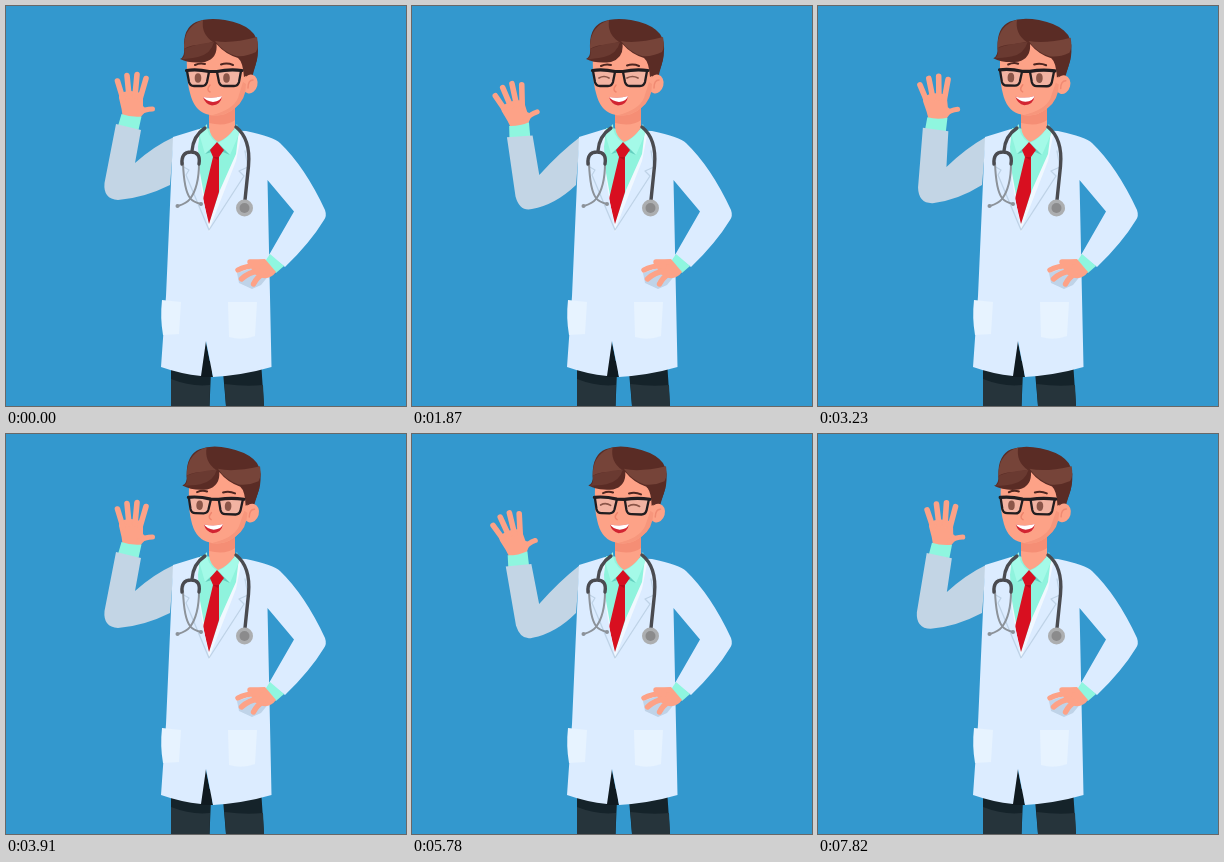
An HTML page that plays this animation: 400 by 400 pixels, repeating every 7990 ms.

```html
<!DOCTYPE html>
<html lang="en">
<head>
<meta charset="utf-8">
<title>Waving doctor</title>
<style>
  html, body { margin: 0; width: 100%; height: 100%; overflow: hidden; background: #3398ce; }
  svg { display: block; width: 100vw; height: 100vh; }
  .line { fill: none; stroke-linecap: round; stroke-linejoin: round; }
</style>
</head>
<body>
<svg viewBox="0 0 400 400">
  <!-- trousers -->
  <path fill="#15232a" d="M165 355H255L258 400H220L217 366H205L203.500 400H165Z"/>
  <path fill="#26343b" d="M165 373Q185 381 204 379L203.500 400H165ZM218.500 378Q240 381 257 379L258 400H220Z"/>
  <path fill="#101a20" d="M199 332L207 371H194Z"/>

  <!-- waving arm -->
  <g id="hand">
    <path fill="#fda287" d="M113 88Q124 82 137 88Q137 95 137 100Q142 104 139 106L133 113H117Q116 103 113 92Z"/>
    <g class="line" stroke="#fda287" stroke-width="5.600">
      <path d="M111.500 75L117 93M121 69.500L123 90M131 68.500L129 90M140 72.500L134 93"/>
      <path d="M133 107Q139 103 146.500 103" stroke-width="5"/>
    </g>
    <path fill="#8ff6df" d="M115.500 108Q125 111.500 135.500 110.500L132.500 124L112 120Z"/>
  </g>
  <path id="sleeve" fill="#c3d5e5"/>

  <!-- coat -->
  <path fill="#dcecff" d="M193 123L167 131L160 290L155 361Q175 368 195 370L200 335L207 371Q238 369 265.500 361L261.500 174L288 205.500L263 249L279 261Q304 237 318 214Q321 210 319 204Q299 161 274 137Q268 131 240 125Z"/>
  <path fill="#e7f3ff" d="M156 294L175 296L173 328L157 329Q154 312 156 294ZM222 296H251L249 330Q236 335 223 331Z"/>

  <!-- shirt, neck, tie -->
  <path fill="#f1f8ff" d="M191 124L184 153L203 226L234 155L236 125Z"/>
  <path fill="#8ff3dd" d="M194 122L191 150L203 217L214 184L230 148L233 124Z"/>
  <path fill="#fda287" d="M203 98L229 92V122Q222 132 212 136Q204 131 203 121Z"/>
  <path fill="#f58e75" d="M203 106Q222 110 229 98V114Q220 121 203 117Z"/>
  <path fill="#a4fae8" d="M201 118Q200 129 211 137L199 148L193 127ZM231 118Q225 131 212 137L224 149L233 128Z"/>
  <path fill="#64cfbf" d="M211 137L199 148L206 146ZM212 137L224 149L217 146Z"/>
  <path fill="#d80f20" d="M211 136L218 144L213 151L213 186L203 218L197 193L207 151L204 144Z"/>
  <path fill="#b80b1a" d="M207 151L213 151L212 154Z"/>
  <!-- lapels -->
  <path fill="#dcecff" d="M191 124L185 133L177 162L183 164L181 170L203 224L194 174ZM236 125L242 162L234 165L238 170L203 224L230 155Z"/>
  <path class="line" stroke="#bfd3e7" stroke-width="1.300" d="M180 145L176 160L183 164L180 169L203 224L238 170L233 165L242 161L239 145"/>

  <!-- stethoscope -->
  <g class="line" stroke-width="3.400">
    <path stroke="#8c9299" stroke-width="2" d="M177 157Q178 184 184 192Q187 196 195 198M193 157Q193 181 184 193Q181 197 172 200"/>
    <path stroke="#4a4b50" d="M199 122Q187 130 186 145M176 158Q175 146 185 146Q195 146 193 158M230 121Q245 133 242.500 160L239 194"/>
  </g>
  <circle cx="171.500" cy="200" r="2" fill="#8c9299"/><circle cx="195" cy="198" r="2" fill="#8c9299"/>
  <circle cx="238.500" cy="202" r="8.500" fill="#acaeb0"/>
  <circle cx="238.500" cy="202" r="5" fill="#8b8b8c"/>

  <!-- hand on hip -->
  <path fill="#bfd3e8" d="M231 267L246 262L264 268L255 279L246 283L233 277Z"/>
  <path fill="#8ff6df" d="M264 248L278 260L270 267L258 257Z"/>
  <path fill="#fda287" d="M259 253L270 266Q265 273 257 272L246 267L245 255Z"/>
  <path class="line" stroke="#fda287" stroke-width="5.400" d="M257 256L244 256M252 260Q241 259 232 264M253 265Q243 266 235.500 273M257 268Q251 271 247.500 278"/>

  <!-- head -->
  <g id="head">
    <path fill="#5a2c25" d="M205 28L243 24Q253 34 251 53L246 72L236 77Z"/>
    <ellipse cx="244" cy="78" rx="7.500" ry="9.500" fill="#fda287" transform="rotate(14 244 78)"/>
    <path class="line" stroke="#f08a72" stroke-width="1.500" d="M242 82Q242 74 247 74"/>
    <path fill="#fda287" d="M181 44Q180 74 184 87Q188 104 200 108Q216 113 229 102Q240 92 240 68L234 38H190Z"/>
    <path fill="#f7967c" d="M237 76L240 78Q240 94 229 102Q218 111 205 109.500Q227 104 232 92Z"/>
    <path fill="#5a2c25" d="M174 53Q179 51 178 42Q177 22 190 16Q202 11 219 14Q236 17 244 24Q253 31 252 45Q252 54 247 66L238 71Q237 56 232 52Q219 48 210.500 38Q212 52 199 56Q184 58 174 53Z"/>
    <path fill="#764439" d="M178 39Q179 20 197 14Q195 28 207 36Q200 38 192 39Q184 39 178 43ZM209 35Q225 38 251 31Q253 41 250 46Q240 51 230 50Q217 46 209 35Z"/>
    <path fill="#6a3a31" d="M178 43Q189 38 208 36Q205 48 192 51Q181 53 176 53Q180 50 178 43Z"/>
    <g id="brows" class="line" stroke="#4e2620" stroke-width="2">
      <path d="M189 59Q194 56.500 199 58M215 58.500Q221 56.500 227 59"/>
    </g>
    <path fill="#f2b3a2" d="M181 65H202L200 79Q191 82 183 78ZM212 65H235L232 78Q222 82 214 79Z"/>
    <g id="eyes" fill="#8b5649">
      <ellipse cx="192" cy="72" rx="3.300" ry="4.800"/>
      <ellipse cx="220.500" cy="72" rx="3.300" ry="4.800"/>
    </g>
    <path id="lids" class="line" stroke="#8b5649" stroke-width="1.700" d="M187 72Q192 69 197 72M215 72Q220.500 69 226 72"/>
    <g class="line" stroke="#211d20" stroke-width="2.300">
      <path d="M181 65L183 76Q184 80 188 80H196Q200 80 201 76L203 66M211 66L213 76Q214 80 218 80H228Q232 80 233 76L235 65"/>
      <path stroke-width="3.200" d="M180.500 64.500Q191 63 203 65.500H211Q223 63 236 64.500"/>
    </g>
    <path class="line" stroke="#ef856d" stroke-width="1.500" d="M204 79Q200 84 204 86"/>
    <path fill="#d22532" d="M197 91Q207 93 216 90Q215 99 206 99.500Q199 98 197 91Z"/>
    <path fill="#fff" d="M197 91Q207 93 216 90Q215 95 207 96Q200 95 197 91Z"/>
  </g>
</svg>
<script>
const LOOP = 7990, STEP = 170, WAVE = 4080, PEAK = 1530, REST = 3910;
const el = id => document.getElementById(id);
const clamp = v => Math.max(0, Math.min(1, v));
const ramp = (t, from, to) => clamp((t - from) / (to - from));

// s runs from 0 (forearm upright) to 1 (swung outwards)
function poseArm(s) {
  const deg = -20.6 * s, a = deg * Math.PI / 180;
  const dx = 2.8 * s, dy = 11.2 * s;
  const p = (x, y) => {
    const u = x - 113, v = y - 176;
    return [113 + dx + u * Math.cos(a) - v * Math.sin(a),
            176 + dy + u * Math.sin(a) + v * Math.cos(a)].map(n => n.toFixed(2)).join(' ');
  };
  el('hand').setAttribute('transform', `translate(${dx} ${dy}) rotate(${deg} 113 176)`);
  el('sleeve').setAttribute('d',
    `M${p(110, 118)}L${p(98.5 + 2 * s, 177)}Q${p(97 + 3 * s, 193)} ${p(112, 194)}` +
    `Q${138 + 6 * s} ${192 + 8 * s} 164 179L168 131` +
    `Q${148 - s} ${140 + 8 * s} ${129 - 2 * s} ${157 + 14 * s}L${p(135, 124)}Z`);
}

function draw(now) {
  const t = Math.floor(now % LOOP / STEP) * STEP, w = t % WAVE;
  poseArm(w < PEAK ? w / PEAK : 1 - ramp(w, PEAK, REST));

  const tilt = 2 * (ramp(t, 2380, REST) - ramp(t, 7650, 9180));
  el('head').setAttribute('transform', `rotate(${tilt} 215 118)`);

  const open = clamp((Math.abs(w - 1700) - 170) / 340);
  el('eyes').setAttribute('transform', `translate(0 ${72 * (1 - open)}) scale(1 ${open})`);
  el('lids').style.display = open ? 'none' : '';
  el('brows').setAttribute('transform', `translate(0 ${1 - open})`);
}

const start = performance.now();
function tick() {
  draw(performance.now() - start);
  requestAnimationFrame(tick);
}
tick();
</script>
</body>
</html>
```
